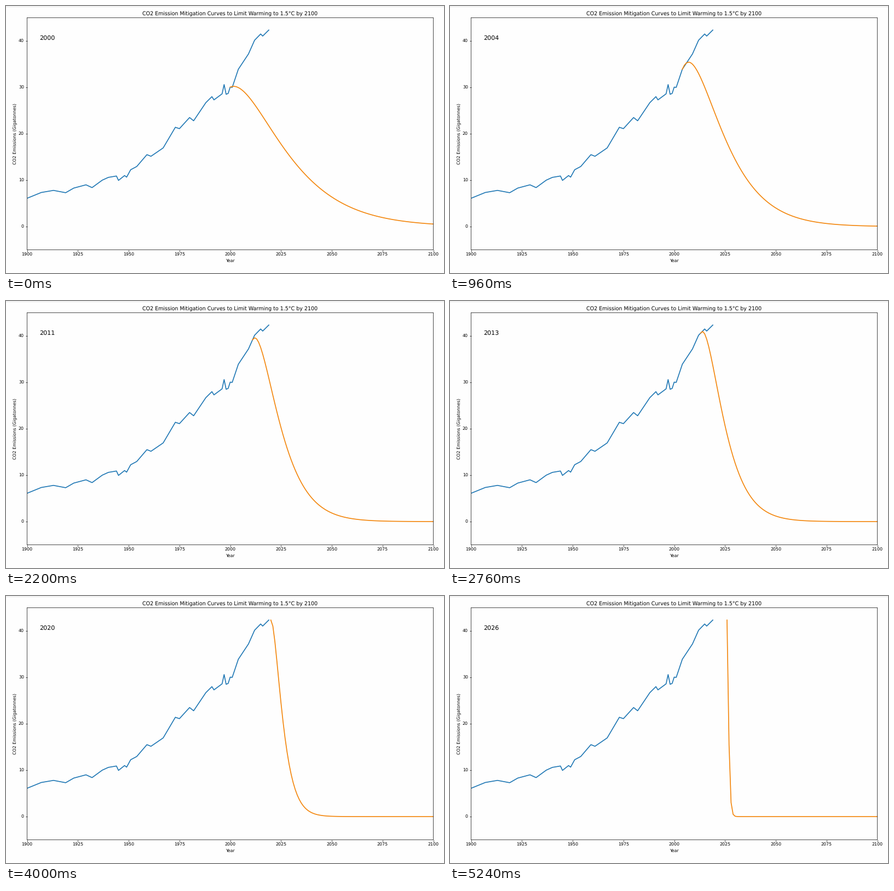
These frames come from a looping animation (800x489 px, 5400 ms). A matplotlib script:

```python
import numpy as np
import matplotlib.pyplot as plt
from matplotlib.animation import FuncAnimation
from matplotlib.lines import Line2D

W, H, DPI = 800, 489, 64
SCALE = (W / 14) / DPI        # type is sized for a 14 inch wide sheet
BLUE, ORANGE, PAPER = "#1f77b4", "#f3860c", "#fefefe"
FIRST, LAST_DATA, END = 1900, 2019, 2100
START_YEAR, STOP_YEAR = 2000, 2026
BUDGET, BUDGET_YEAR = 420, 2018   # Gt left from the start of that year
TREND = 6                         # years used for the growth rate

# Turning points of the emissions; straight lines run between them.
TURNS = {
    1900: 6.1, 1907: 7.35, 1913: 7.8, 1919: 7.3, 1923: 8.3, 1929: 9.0,
    1932: 8.4, 1937: 10.0, 1940: 10.6, 1944: 10.9, 1945: 9.95, 1948: 11.0,
    1949: 10.65, 1951: 12.25, 1954: 12.95, 1959: 15.5, 1961: 15.15,
    1967: 16.95, 1973: 21.4, 1975: 21.1, 1980: 23.5, 1982: 22.8,
    1988: 26.7, 1991: 28.0, 1992: 27.3, 1996: 28.6, 1997: 30.6,
    1998: 28.5, 1999: 28.7, 2000: 30.05, 2001: 30.0, 2004: 33.9,
    2009: 37.2, 2012: 40.15, 2015: 41.5, 2016: 41.05, 2019: 42.35,
}
# Beyond the last turning point emissions stay level.
YEARS = np.arange(FIRST, STOP_YEAR + 1)
HISTORY = np.interp(YEARS, list(TURNS), list(TURNS.values()))
TOTAL = np.cumsum(HISTORY)


def mitigation(year):
    """Yearly path E0 (1 + (r + m) t) exp(-m t) that uses up the budget."""
    i = year - FIRST
    level = HISTORY[i]
    recent = np.log(HISTORY[i - TREND + 1:i + 1])
    r = np.polyfit(np.arange(TREND), recent, 1)[0]
    left = BUDGET + TOTAL[BUDGET_YEAR - 1 - FIRST] - TOTAL[i]
    span = left / level
    m = (1 + np.sqrt(1 + span * r)) / span
    t = np.arange(END - year + 1)
    return year + t, level * (1 + (r + m) * t) * np.exp(-m * t)


plt.rcParams.update({
    "font.family": "DejaVu Sans",
    "font.size": 10 * SCALE,
    "text.hinting": "no_hinting",
    "axes.titlesize": 12 * SCALE,
    "axes.titlepad": 6 * SCALE,
    "axes.labelpad": 4 * SCALE,
    "axes.linewidth": 0.9 * SCALE,
    "lines.linewidth": 2.1 * SCALE,
})
for axis in ("xtick", "ytick"):
    plt.rcParams.update({
        f"{axis}.major.size": 3.5 * SCALE,
        f"{axis}.major.pad": 3.5 * SCALE,
        f"{axis}.major.width": 0.9 * SCALE,
    })

fig = plt.figure(figsize=(W / DPI, H / DPI), dpi=DPI, facecolor=PAPER)
ax = fig.add_axes([38.5 / W, 1 - 446.5 / H, 742 / W, 425 / H],
                  facecolor=PAPER)
ax.set(xlim=(FIRST, END), ylim=(-5, 45),
       xticks=range(FIRST, END + 1, 25), yticks=range(0, 41, 10),
       xlabel="Year", ylabel="CO2 Emissions (Gigatonnes)",
       title="CO2 Emission Mitigation Curves to Limit Warming to 1.5°C by 2100")

# Keep frame and ticks at their exact sub-pixel places.
plt.setp([*ax.spines.values(), *ax.xaxis.get_ticklines(),
          *ax.yaxis.get_ticklines()], snap=False)

known = YEARS <= LAST_DATA
ax.plot(YEARS[known], HISTORY[known], color=BLUE)
path, = ax.plot([], [], color=ORANGE)
label = fig.text(60.7 / W, 1 - 62 / H, "", fontsize=14 * SCALE)

# faint edges of the sheet
for y in (0.5, H - 0.5):
    fig.add_artist(Line2D([0, 1], [y / H, y / H], color="#e4e4e4",
                          lw=72 / DPI))


def update(step):
    year = START_YEAR + step
    path.set_data(*mitigation(year))
    label.set_text(str(year))
    return path, label


anim = FuncAnimation(fig, update, frames=STOP_YEAR - START_YEAR + 1,
                     interval=200, repeat=True, repeat_delay=0)
plt.show()
```
